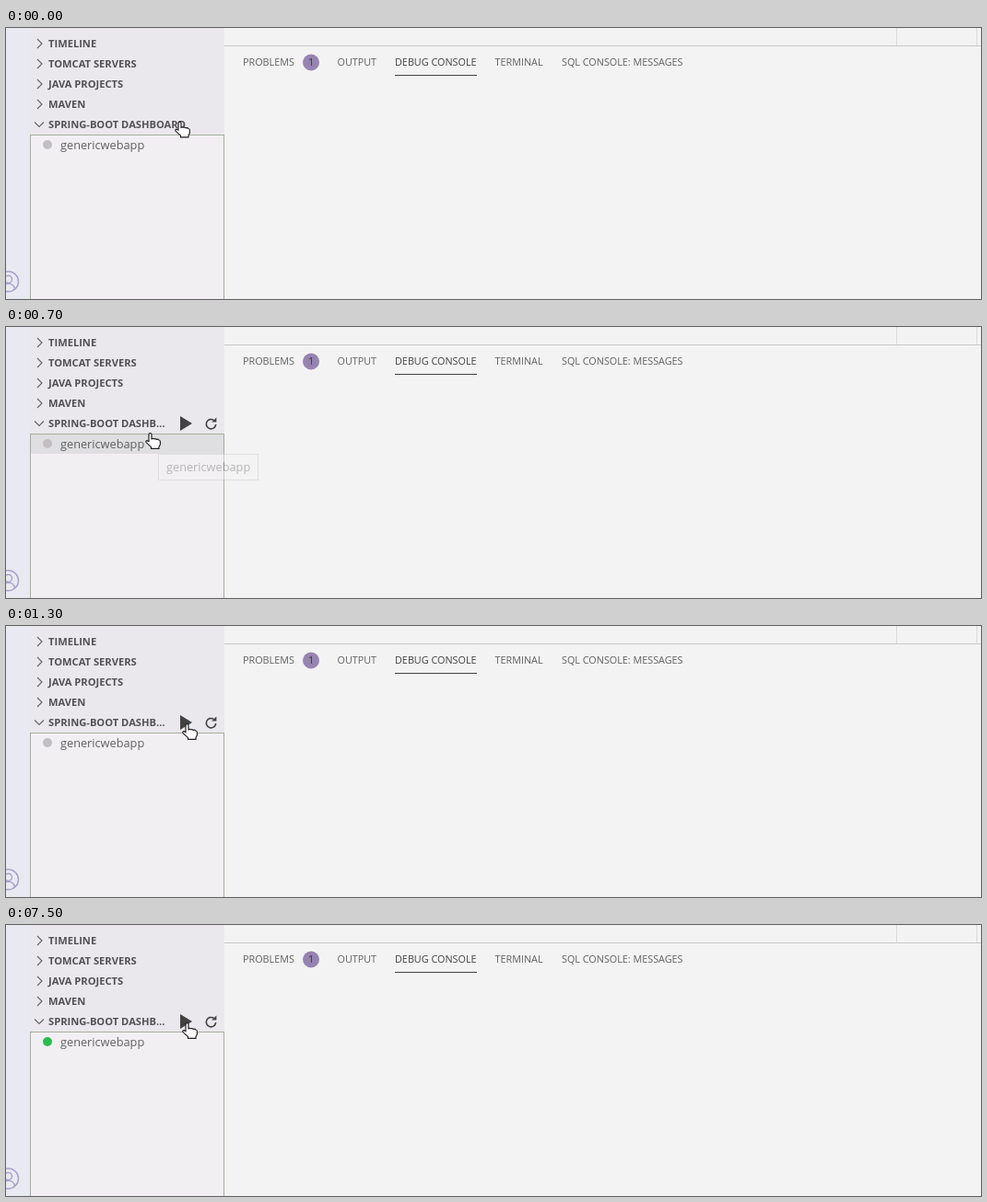
Recreate the animation shown at these times as an HTML page. Size 1058 by 295 pixels, loop 8 s.

```html
<!DOCTYPE html>
<html lang="en">
<head>
<meta charset="utf-8">
<title>Spring Boot dashboard</title>
<style>
  html, body { margin: 0; width: 100%; height: 100%; overflow: hidden; background: #f3f3f3; }
  svg { display: block; font: 12.75px "Open Sans", "Noto Sans", sans-serif; fill: #616161; }
  .head { font-size: 11.15px; font-weight: 700; fill: #515154; }
  .tab { font-size: 10.8px; }
  .line { fill: none; stroke: #646465; stroke-width: 1.1; }
</style>
</head>
<body>
<svg width="1058" height="295" viewBox="0 0 1058 295">
  <rect width="1058" height="295" fill="#f3f3f3"/>
  <path d="M237 19.5H1058" stroke="#c8c8c8"/>
  <path d="M966.5 0V19M1053.5 0V19" stroke="#dadada"/>

  <!-- activity bar and account icon -->
  <rect width="26" height="295" fill="#e9eaf1"/>
  <g fill="none" stroke="#aaa0cc" stroke-width="1.5">
    <circle cx="2.5" cy="276" r="11"/>
    <circle cx="2.5" cy="273.5" r="4"/>
    <path d="M-4.5 284.5C-4 276 9 276 9.5 284.5"/>
  </g>

  <!-- side bar -->
  <rect x="26" width="211" height="116" fill="#ebe8ed"/>
  <rect x="26.5" y="116.5" width="210" height="190" fill="#f2eff3" stroke="#a3b09c"/>
  <rect id="hover" x="27" y="117" width="209" height="21" fill="#dfdee0"/>
  <g id="heads" class="head"></g>
  <path class="line" d="M31 102.5l5 5 5-5"/>
  <text id="title" class="head" x="46" y="109"></text>
  <g id="icons">
    <path id="play" d="M189 97L202 105 189 113Z" fill="#424242"/>
    <path d="M225.5 101.4A5.2 5.2 0 1 0 227.7 106" fill="none" stroke="#424242" stroke-width="1.6"/>
    <path d="M228.4 98.5V103.6H223.2Z" fill="#424242"/>
  </g>
  <rect id="progress" x="26" y="114" width="4" height="2" fill="#705697"/>
  <circle id="dot" cx="45" cy="127" r="5"/>
  <text x="59" y="132">genericwebapp</text>

  <!-- panel tabs -->
  <g id="tabs" class="tab"></g>
  <circle cx="331" cy="37.5" r="9" fill="#9783b1"/>
  <text class="tab" x="331" y="41.3" text-anchor="middle" fill="#333">1</text>
  <path d="M422 51.5H511" stroke="#424242"/>

  <g id="tip">
    <rect x="165.5" y="138.5" width="108" height="28" fill="#f3f3f3" stroke="#c8c8c8"/>
    <text x="174" y="157">genericwebapp</text>
  </g>
  <path id="hand" fill="#fff" stroke="#222" stroke-width="1.2" stroke-linejoin="round"
    d="M4 2.2a1.5 1.5 0 0 1 3 0V7Q8.2 5.8 9.6 6.8 11 6 12.2 7.4 14 6.6 14.8 8 16.4 8 16.4 10V13L15 15.3V17.4H6.5V15.6L1 10.6Q.3 9 2 8.6L4 9.8Z"/>
</svg>
<script>
  const LOOP = 8000;
  const $ = id => document.getElementById(id);
  const show = (id, on) => $(id).setAttribute("opacity", +on);
  const between = (t, from, to) => t >= from && t < to;

  $("heads").innerHTML = ["TIMELINE", "TOMCAT SERVERS", "JAVA PROJECTS", "MAVEN"].map((name, i) =>
    `<path class="line" d="M34 ${12 + 22 * i}l5 5-5 5"/><text x="46" y="${21 + 22 * i}">${name}</text>`).join("");

  $("tabs").innerHTML = [
    [257, "PROBLEMS"], [359.5, "OUTPUT"], [422, "DEBUG CONSOLE"],
    [530.5, "TERMINAL"], [603, "SQL CONSOLE: MESSAGES"]
  ].map(([x, name]) =>
    `<text x="${x}" y="41" fill="${x === 422 ? "#424242" : "#616161"}">${name}</text>`).join("");

  // time, x, y: the pointer jumps from place to place
  const pointer = [
    [0, 183, 101.5], [300, 151, 114], [700, 151, 115],
    [900, 194, 109], [1200, 193, 108], [1300, 191, 106]
  ];

  function draw(now) {
    const t = now % LOOP;
    const [, x, y] = pointer.filter(p => p[0] <= t).pop();
    $("hand").setAttribute("transform", `translate(${x} ${y})`);
    $("title").textContent = t < 100 ? "SPRING-BOOT DASHBOARD" : "SPRING-BOOT DASHB…";
    show("icons", t >= 100);
    show("hover", between(t, 300, 900));
    show("tip", between(t, 700, 800) ? 0.4 : between(t, 800, 900) ? 0.85 : 0);
    show("play", between(t, 1500, 1800) ? 0.88 : 1);
    show("progress", between(t, 7400, 7500));
    $("dot").setAttribute("fill", t < 7500 ? "#c1bfc3" : "#2cbc4e");
  }

  const start = performance.now();
  function frame() {
    draw(performance.now() - start);
    requestAnimationFrame(frame);
  }
  frame();
</script>
</body>
</html>
```
